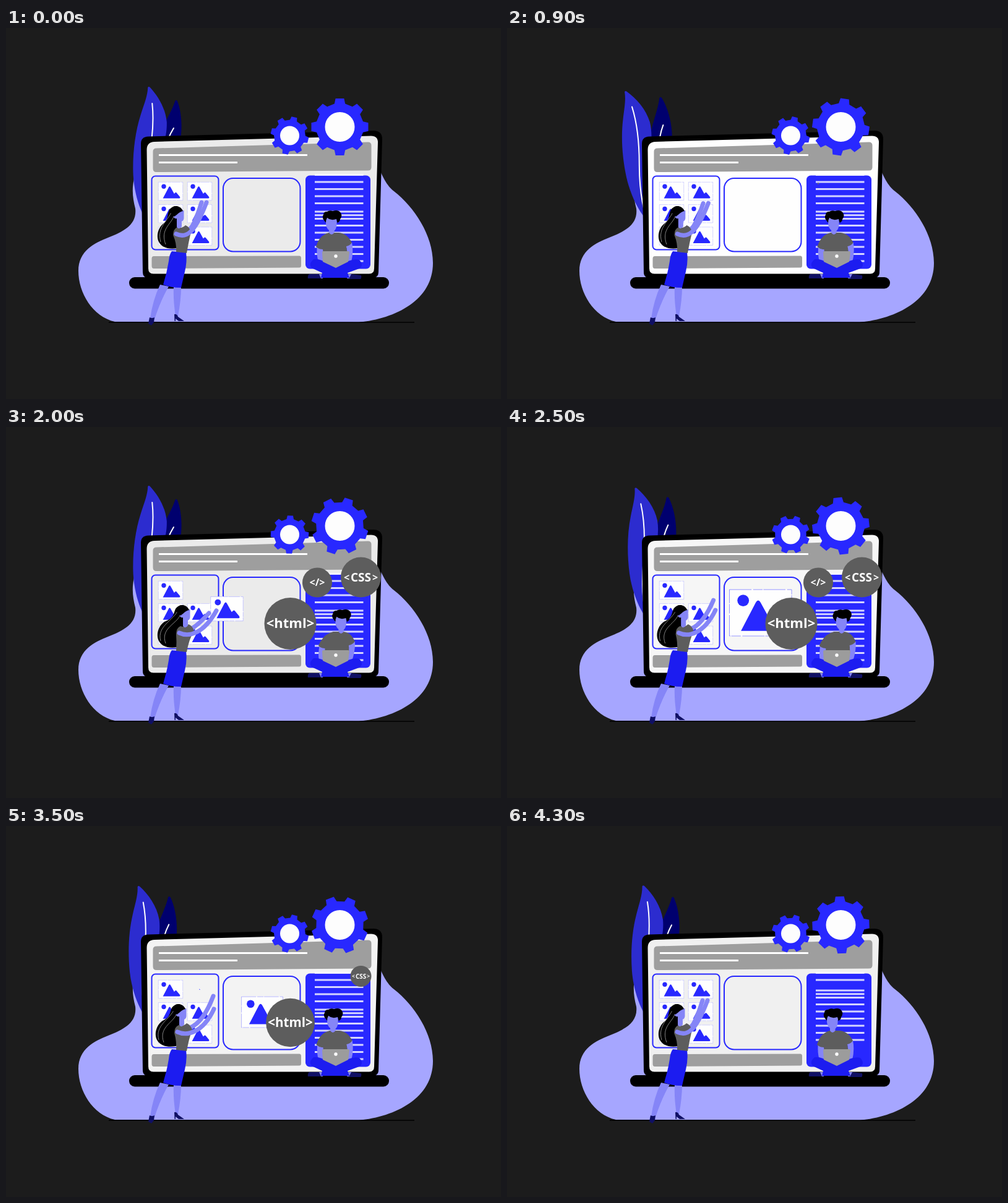
Recreate the animation shown at these times as an HTML page. Size 800x600 px, loop 4400 ms.

```html
<!DOCTYPE html>
<html lang="en">
<head>
<meta charset="utf-8">
<title>Building a page</title>
<style>
  html, body { margin: 0; width: 100%; height: 100%; overflow: hidden; background: #1c1c1c; }
  svg { display: block; width: 100vw; height: 100vh; }
  text { font: 700 16px "Open Sans", "Noto Sans", sans-serif; fill: #fff; text-anchor: middle; }
  .blue { fill: #2828ff; }
  .skin { fill: #8585f7; }
  .arm { fill: none; stroke: #8585f7; stroke-width: 7; stroke-linecap: round; }
  .grey { fill: #9e9e9e; }
  .shirt { fill: #5d5d5d; }
  .trousers { fill: #1c1cf0; }
  .navy { fill: #101064; }
  .frame { fill: none; stroke: #2828ff; stroke-width: 2; }
  .vein { fill: none; stroke: #fff; stroke-width: 2; stroke-linecap: round; }
  .lock { fill: none; stroke: #bbb; stroke-width: .7; }
</style>
</head>
<body>
<svg viewBox="0 0 800 600">
  <defs>
    <g id="pic">
      <rect x="-20" y="-15" width="40" height="30" fill="#fefefe"/>
      <rect x="-19.7" y="-14.7" width="39.4" height="29.4" fill="none" stroke="#2828ff" stroke-width=".3" stroke-dasharray="14 1 6 .5" opacity=".65"/>
      <circle class="blue" cx="-11" cy="-7.8" r="3.7"/>
      <path class="blue" d="M-12.4 11.5 L-3 -6.6 Q-1.5 -9 0 -6.6 L5.8 4 L7.6 2.2 Q8.6 1.4 9.6 2.4 L15 9 Q16 11.5 14 11.5 Z"/>
    </g>
  </defs>

  <path fill="#a6a6ff" d="M176 475 C140 467 117 428 117 393 C117 360 143 348 165 339 C190 329 212 318 209 292 C205 276 203 262 207 243 L400 220 L606 234 C612 247 617 256 627 264 C660 290 690 335 690 380 C690 440 630 470 570 476 Z"/>
  <path d="M166 476 H660" stroke="#000" stroke-width="1.6"/>

  <g id="backLeaf">
    <path fill="#00006e" d="M273.5 118 Q275 115.5 277 118 C286 140 288 185 270 215 L255 247 C238 220 238 195 248 172 C257 151 268 135 273.5 118 Z"/>
    <path class="vein" d="M271 162 Q266 170 262 180"/>
  </g>
  <g id="leaf">
    <path fill="#2c2ccf" d="M229.5 96 Q231 94 233 96 C246 110 258 130 260 152 C261 185 246 205 238 230 C231 255 232 280 222 302 C213 286 206 258 205.5 232 C205 200 209 168 218 140 C224 121 229 110 229.5 96 Z"/>
    <path class="vein" d="M236.5 122 C240 155 236 185 230 215 C225 240 221 270 224 300"/>
  </g>

  <path d="M230 175.5 L594 166 Q608 166 608 180 L602 395 Q602 404 592 404 H230 Q221 404 221 395 L218 187 Q218 176 230 175.5 Z"/>
  <rect x="199" y="403" width="420" height="18.5" rx="9"/>
  <path id="screen" d="M240 184 L590 174.5 Q601 174.5 601 185 L595 389 Q595 397.5 587 397.5 H238 Q230 397.5 230 389 L227.5 197 Q227.5 184.5 240 184 Z"/>
  <path class="grey" d="M243 194.5 L585 184.5 Q590.5 184.5 590.5 190 V225 Q590.5 230.5 585 230.5 L243 233 Q237.5 233 237.5 227 V200 Q237.5 194.5 243 194.5 Z"/>
  <path d="M247 205.5 H487 M247 217.5 H374" stroke="#fff" stroke-width="3"/>
  <rect class="frame" x="235.5" y="239.5" width="108" height="119" rx="6"/>
  <rect class="frame" x="351" y="243" width="124.5" height="118.5" rx="16"/>
  <path class="grey" d="M239 369 L474 368.5 Q477 368.5 477 372 V384 Q477 387.5 474 387.5 L239 389 Q235.5 389 235.5 385 V373 Q235.5 369 239 369 Z"/>
  <rect class="blue" x="484" y="238.5" width="105" height="151" rx="7"/>
  <path id="lines" stroke="#fff" stroke-opacity=".8" stroke-width="3"/>

  <g id="cards"></g>
  <use id="slot" href="#pic"/>
  <use id="moving" href="#pic"/>

  <g id="man">
    <g id="torso">
      <path class="skin" d="M503 350 Q501 368 506 381 L516 381 Q511 366 514 350 Z M549 348 Q553 364 549 380 L558 379 Q562 362 559 347 Z"/>
      <path class="shirt" d="M522 331 H538 Q551 332 559 347 Q556 352 550 353 L552 366 H513 L512 358 Q506 358 501 354 Q506 335 522 331 Z"/>
    </g>
    <g id="head">
      <path class="skin" d="M520 308 H537.5 V318 Q537 325 533.5 328 V331 Q529 337 525 331 V327 Q520 323 520 316 Z"/>
      <path d="M517 311 Q513 306 516 302 Q516 297 522 297 Q526 294 531 296 Q540 293 544 299 Q547 304 543 309 Q543 313 538.5 315 L537 309 Q528 312 522 307 Q520 310 520 315 Z"/>
    </g>
    <path class="skin" d="M503 398 h9 v7 h-9 Z M551 398 h8 v7 h-8 Z"/>
    <path class="trousers" d="M497 374 Q505 373 513 377 L533 387 L553 377 Q563 373 571 375 Q579 384 571 389 L552 396 L555 404 H509 L511 396 L496 389 Q487 383 497 374 Z"/>
    <path class="navy" d="M490 398 H506 L509 405 H488 Q487 400 490 398 Z M558 398 L574 400 Q575 404 573 406 H554 Z"/>
    <path fill="#9c9c9c" d="M513 361 H553 Q555 361 555 363 L553 378 L533 388 L512 378 L511 363 Q511 361 513 361 Z"/>
    <circle cx="533" cy="369" r="2.7" fill="#fff"/>
  </g>

  <g id="woman">
    <path class="skin" d="M249 415 L263 418 Q250 440 240 471 L233 470 Q237 440 249 415 Z M271 418 H283 Q283 440 278 466 L274 466 Q270 440 271 418 Z"/>
    <path class="navy" d="M232 468 Q236 470 240 468 L239 476 L235 481 L230 478 Z M272 463 Q276 462 278 467 L288 474 H279 L274 470 V474 H272.5 Z"/>
    <path id="hair"/>
    <path id="locks" class="lock"/>
    <path id="backArm" class="arm"/>
    <path class="trousers" d="M268 361 L291 363 Q293 378 289 394 L283 420 Q266 420 254 415 Q260 396 263 377 Q264 366 268 361 Z"/>
    <path id="top" class="shirt"/>
    <g id="face">
      <path class="skin" d="M273 302 Q270 303 271 306 Q273 309 276 308 V322 Q280 327 284 321 V313 Q288 311 287.5 306 V295 L277 296 Z"/>
      <path d="M264 297 Q268 287 276 288 Q283 289 286 296 Q281 297 276 302 L272 305 Z"/>
    </g>
    <path id="frontArm" class="arm"/>
  </g>

  <g id="badgeTag"><circle r="24" class="shirt"/><text y="5.5">&lt;/&gt;</text></g>
  <g id="badgeCss">
    <circle r="32.5" class="shirt"/>
    <text y="7" style="font-size:19px;font-stretch:condensed">CSS</text>
    <text x="-23" y="6">&lt;</text><text x="23" y="6">&gt;</text>
  </g>
  <g id="badgeHtml"><circle r="42" class="shirt"/><text y="7" style="font-size:22px">&lt;html&gt;</text></g>

  <path id="bigGear" class="blue"/>
  <circle cx="539.5" cy="160" r="24" fill="#fdfdfd"/>
  <path id="smallGear" class="blue"/>
  <circle cx="458.5" cy="174" r="15.5" fill="#fdfdfd"/>
</svg>
<script>
const LOOP = 4400, STEP = 100, TAU = Math.PI * 2;
const $ = id => document.getElementById(id);
const set = (id, name, value) => $(id).setAttribute(name, value);
const move = (id, value) => set(id, 'transform', value);
const mix = (a, b, p) => a + (b - a) * p;
const ramp = (t, from, to) => Math.max(0, Math.min(1, (t - from) / (to - from)));
const smooth = (t, from, to) => { const p = ramp(t, from, to); return p * p * (3 - 2 * p); };
const shrink = (t, from) => 1 - ramp(t, from, from + 700) ** 2.2;

// Key poses of the woman: head and hair shift, then elbow and hand points
const REST = { head: 0, hair: 0, elbow: [304, 335], hand: [324, 282], elbow2: [303, 324], hand2: [316, 282] };
const CARRY = { head: 10, hair: 0, elbow: [319, 335], hand: [340, 297], elbow2: [313, 318], hand2: [328, 301] };
const REACH = { head: 4, hair: -3, elbow: [318, 335], hand: [336, 296], elbow2: [319, 318], hand2: [335, 275] };

function blend(a, b, p) {
  const out = {};
  for (const key in a) {
    out[key] = Array.isArray(a[key]) ? a[key].map((v, i) => mix(v, b[key][i], p)) : mix(a[key], b[key], p);
  }
  return out;
}

function gear(inner, outer) {
  const points = [];
  for (let i = 0; i < 8; i++) {
    for (const [deg, r] of [[-13, inner], [-8.5, outer], [8.5, outer], [13, inner]]) {
      const a = (i * 45 + deg) * TAU / 360;
      points.push(`${(r * Math.sin(a)).toFixed(2)} ${(-r * Math.cos(a)).toFixed(2)}`);
    }
  }
  return 'M' + points.join('L') + 'Z';
}

function layCards() {
  let html = '';
  for (let row = 0; row < 3; row++) {
    for (const x of [266, 313]) {
      if (row || x === 266) html += `<use href="#pic" x="${x}" y="${264 + 36.3 * row}"/>`;
    }
  }
  $('cards').innerHTML = html;
}

// New lines are inserted at the top and push the block below them down
function drawLines(t) {
  const gap = 11.5, push = 31 * smooth((t + 850) % 1000, 150, 350);
  const ys = [];
  for (let y = 237.5; y < 261 + push - gap / 2; y += gap) ys.push(y);
  for (let i = 0; i < 3; i++) ys.push(266 + push + i * gap / 2);
  for (let i = 1; i < 7; i++) ys.push(277 + push + i * gap);
  set('lines', 'd', ys.map(y => `M499 ${y}H577.5`).join(''));
}

function drawWoman(t) {
  let pose = blend(REST, CARRY, ramp(t, 800, 2000));
  pose = blend(pose, REACH, smooth(t, 2000, 2700));
  pose = blend(pose, REST, smooth(t, 3600, 4100));
  const { head: h, hair: b, elbow, hand, elbow2, hand2 } = pose, s = h / 2;
  set('hair', 'd', `M${285 + h} 297 C${283 + h} 287 ${270 + h} 285 ${264 + h} 294` +
    ` C${260 + h} 303 ${262 + h} 309 ${256 + b} 315 C${246 + b} 322 ${242 + b} 336 ${247 + b} 346` +
    ` C${253 + b} 357 ${266 + b} 358 ${278 + b} 356 L${282 + s} 332 L${279 + h} 318 L${277 + h} 300 Z`);
  set('locks', 'd', `M${268 + h} 296 C${262 + h} 312 ${243 + b} 322 ${250 + b} 346` +
    ` M${271 + h} 305 C${266 + h} 318 ${249 + b} 326 ${258 + b} 350`);
  set('top', 'd', `M${277 + s} 322 Q${284 + s} 325 ${290 + s} 319 Q${297 + s} 322 ${299 + s} 330` +
    ` Q296 342 292 364 L275 362 Q276 348 ${270 + s} 335 Q${270 + s} 325 ${277 + s} 322 Z`);
  move('face', `translate(${h} 0)`);
  set('frontArm', 'd', `M${275 + s} 333 C${290 + s} 340 ${elbow} ${hand}`);
  set('backArm', 'd', `M${294 + s} 327 Q${elbow2} ${hand2}`);
}

function drawMan(t) {
  const lean = ((1 - Math.cos(TAU * t / LOOP)) / 2) ** 2;
  const k = 7 * lean / 53;
  move('torso', `matrix(1 0 ${-k} 1 ${k * 385} 0)`);
  move('head', `translate(${16 * lean - 3} 0)`);
}

function drawCard(t) {
  const carry = ramp(t, 1000, 2000), drop = smooth(t, 2000, 2600);
  const x = mix(mix(313, 357, carry), 414, drop);
  const y = mix(mix(264, 294, carry), 301, drop);
  const size = mix(1 + carry * carry / 3, 2.65, drop) * shrink(t, 3060);
  move('moving', `translate(${x} ${y}) scale(${size})`);
  move('slot', `translate(313 264) scale(${smooth(t, 3400, 4000)})`);
}

function drawBadge(id, x, y, t, grow, end) {
  move(id, `translate(${x} ${y}) scale(${smooth(t, grow, grow + 700) * shrink(t, end)})`);
}

function draw(t) {
  const sway = (1 - Math.cos(TAU * (t + 50) / 2000)) / 2;
  move('leaf', `rotate(${-11.3 * sway} 247 300)`);
  move('backLeaf', `rotate(${-11.3 * sway} 236 254)`);
  const white = Math.round(235 + 19 * sway);
  set('screen', 'fill', `rgb(${white},${white},${white})`);

  const p = t / LOOP;
  move('bigGear', `translate(539.5 160) rotate(${180 * p + 27 * Math.sin(Math.PI * p)})`);
  move('smallGear', `translate(458.5 174) rotate(${14 - 225 * p})`);

  drawLines(t);
  drawCard(t);
  drawMan(t);
  drawWoman(t);
  drawBadge('badgeTag', 503, 251.5, t, 800, 2700);
  drawBadge('badgeCss', 573.5, 243, t, 1100, 3000);
  drawBadge('badgeHtml', 459.5, 318, t, 1300, 3300);
}

layCards();
set('bigGear', 'd', gear(38.5, 46.5));
set('smallGear', 'd', gear(25.5, 31));

const start = performance.now();
function tick(now) {
  let step = Math.floor((Math.max(0, now - start) % LOOP) / STEP);
  if (step > 10 && step % 10 === 2) step--; // one held step each second
  draw(step * STEP);
  requestAnimationFrame(tick);
}
draw(0);
requestAnimationFrame(tick);
</script>
</body>
</html>
```
